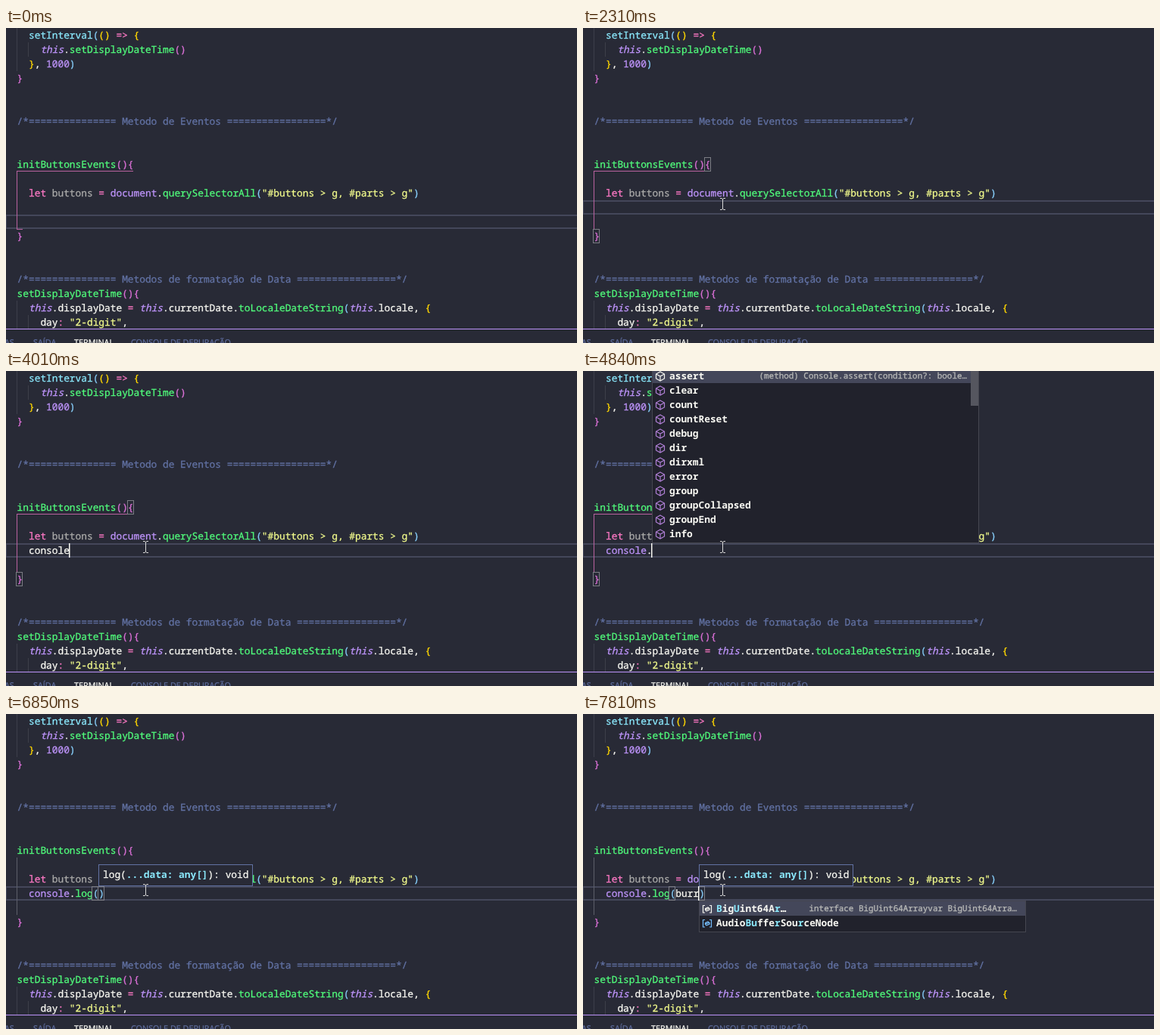
Recreate the animation shown at these times as an HTML page. Size 754 by 417 pixels, loop 8000 ms.

```html
<!DOCTYPE html>
<html lang="pt">
<head>
<meta charset="utf-8">
<title>Editor de código</title>
<style>
  html, body { margin: 0; width: 100%; height: 100%; overflow: hidden; background: #282a36; }
  svg { display: block; width: 754px; height: 417px; }
  text {
    font: 12.83px "Noto Sans Mono", "DejaVu Sans Mono", monospace;
    white-space: pre;
    text-rendering: geometricPrecision;
    fill: currentColor;
    stroke: currentColor;
    stroke-width: .3px;
  }
  .bold { font-weight: 600; stroke: none; }
  .italic { font-style: italic; }
  .detail { font-size: 10.9px; }
  .tab { font: 10.8px "Open Sans", "Noto Sans", sans-serif; }
</style>
</head>
<body>
<svg id="stage" viewBox="0 0 754 417"></svg>
<script>
const LOOP = 8000, BLINK = 490;
const LEFT = 13.9, CHAR = 7.697, ROW = 19;
const BEARING = .7; // text sits slightly right of its cell edge
const CLICK = 1340, CALL = 6360, HINT = 6480;

const color = {
  w: '#f8f8f2', c: '#8be9fd', g: '#50fa7b', p: '#ff79c6', v: '#bd93f9', i: '#bd93f9',
  y: '#f1fa8c', m: '#6272a4', u: '#a9a9a8', 1: '#ffd700', 2: '#da70d6', 3: '#87cefa'
};

// Each "~k" switches the colour key for the text after it.
const code = [
  [0, 2, '~csetInterval~3(~1() ~p=> ~1{'],
  [1, 4, '~ithis~w.~gsetDisplayDateTime~2()'],
  [2, 2, '~1}~w, ~v1000~3)'],
  [3, 0, '~2}'],
  [6, 0, '~m/*=============== Metodo de Eventos =================*/'],
  [9, 0, '~ginitButtonsEvents~2(){'],
  [11, 2, '~plet ~ubuttons ~p= ~vdocument~w.~gquerySelectorAll~3(~y"#buttons > g, #parts > g"~3)'],
  [14, 0, '~2}'],
  [17, 0, '~m/*=============== Metodos de formatação de Data =================*/'],
  [18, 0, '~gsetDisplayDateTime~2(){'],
  [19, 2, '~ithis~w.displayDate ~p= ~ithis~w.currentDate.~gtoLocaleDateString~3(~ithis~w.locale, ~1{'],
  [20, 4, '~wday~p: ~y"2-digit"~w,']
];

// Completion lists; the first letter of each entry is its icon kind.
const lists = {
  c: 'kcase kcatch kclass kconst kcontinue cCalcController mconfirm vconsole vcaches vcrypto mclearInterval mclearTimeout',
  con: 'mconfirm vconsole kconst kcontinue vConstantSourceNode vConvolverNode vCountQueuingStrategy vComment cCalcController vCompositionEvent vAbortController vAudioContext',
  conso: 'vconsole vConstantSourceNode vConvolverNode vCountQueuingStrategy vCompositionEvent',
  dot: 'massert mclear mcount mcountReset mdebug mdir mdirxml merror mgroup mgroupCollapsed mgroupEnd minfo',
  l: 'mlog mtimeLog mclear mtable mdirxml mprofile mprofileEnd mgroupCollapsed mtoLocaleString mvalueOf vlet vlocale',
  b: 'vbuttons kbreak vBlob mblur vbutton vBigInt vBoolean vBarProp vBaseAudioContext vBeforeUnloadEvent vBroadcastChannel vBigUint64Array',
  bu: 'vbuttons vButton vBigUint64Array mblur vAudioBuffer vSourceBuffer vArrayBuffer vSharedArrayBuffer vAudioBufferSourceNode vSourceBufferList vHTMLButtonElement vSubmitEvent',
  burr: 'vBigUint64Ar… vAudioBufferSourceNode'
};
const details = {
  c: '', con: 'function confirm(message?: string | undef…', conso: 'var console: Console',
  dot: '(method) Console.assert(condition?: boole…', l: '(method) Console.log(...data: any[]): void',
  b: 'let buttons: NodeListOf<Element>', bu: 'let buttons: NodeListOf<Element>',
  burr: 'interface BigUint64Arrayvar BigUint64Arra…'
};

// [time, typed text, open list, word being completed]
const typing = [
  [CLICK, ''],
  [2820, 'c'], [2890, 'c', 'c', 'c'], [2970, 'co', 'con', 'co'],
  [3080, 'con', 'con', 'con'], [3240, 'cons', 'conso', 'cons'], [3340, 'conso', 'conso', 'conso'],
  [4010, 'console'],
  [4760, 'console.'], [4830, 'console.', 'dot', ''], [5000, 'console.l', 'l', 'l'],
  [5300, 'console.log'],
  [CALL, 'console.log()'],
  [7140, 'console.log(b)'], [7200, 'console.log(b)', 'b', 'b'], [7290, 'console.log(bu)', 'bu', 'bu'],
  [7540, 'console.log(bur)', 'burr', 'bur'], [7680, 'console.log(burr)', 'burr', 'burr']
];

const stage = document.getElementById('stage');
const colX = n => LEFT + n * CHAR;
const esc = s => s.replace(/&/g, '&amp;').replace(/</g, '&lt;');
const rect = (x, y, w, h, fill) => `<rect x="${x}" y="${y}" width="${w}" height="${h}" fill="${fill}"/>`;
const frame = (x, y, w, h, fill, stroke) =>
  `<rect x="${x + .5}" y="${y + .5}" width="${w - 1}" height="${h - 1}" fill="${fill}" stroke="${stroke}"/>`;
const text = (x, y, s, ink, extra = '') => `<text x="${x}" y="${y}" color="${ink}" ${extra}>${esc(s)}</text>`;

function tokens(x, y, src, extra = '') {
  let out = '';
  for (const part of src.split('~').slice(1)) {
    const s = part.slice(1);
    const style = part[0] === 'i' ? 'class="italic"' : extra;
    out += text(x.toFixed(2), y, s, color[part[0]], style);
    x += s.length * CHAR;
  }
  return out;
}

const codeLine = ([row, col, src]) => tokens(colX(col) + BEARING, row * ROW + 14, src);
const bracketBox = (row, col) => frame(Math.floor(colX(col)), row * ROW, 9, ROW, 'none', '#7c7d84');

function currentLine(y) {
  const edge = '#44475a';
  return rect(0, y, 754, 2, edge) + rect(0, y + 17, 754, 2, edge) + rect(0, y, 1, ROW, edge);
}

function guides(active) {
  const dim = '#3d3f4a';
  let out = rect(14, 0, 1, 57, dim) + rect(29, 19, 1, 19, dim) +
    rect(14, 361, 1, 37, dim) + rect(29, 380, 1, 18, dim);
  if (!active) return out + rect(14, 190, 1, 76, '#5d5f69');
  const pink = '#b9629f';
  return out + rect(14, 189, 154, 1, pink) + rect(14, 189, 1, 78, pink) + rect(14, 266, 8, 1, pink);
}

function panel(hover) {
  const dim = '#5d6b9b', y = 420;
  const tab = (x, s, ink) => text(x, y, s, ink, 'class="tab"');
  return rect(0, 398, 754, 19, '#282a36') + rect(0, 398, 754, 1, '#bd93f9') +
    tab(-2, 'AS', dim) + tab(36, 'SAÍDA', dim) + tab(90, 'TERMINAL', color.w) +
    tab(165, 'CONSOLE DE DEPURAÇÃO', hover ? color.w : dim);
}

const iconPaths = {
  v: ['#75beff', 'M4 2.5H1.5V12H4M10 2.5H12.5V12H10M4.5 6.5L8 5L10 6.5V8L6 9.7L4.5 8.5ZM4.5 6.5L6 7.5L10 6'],
  k: ['#d4d4d4', 'M0 2.5H7M9 2.5H14M0 5.5H4M6 5.5H13M0 8.5H9M11 8.5H14M0 11.5H6M8 11.5H13'],
  m: ['#b180d7', 'M7 1L12.5 4V10L7 13L1.5 10V4ZM1.5 4L7 7L12.5 4M7 7V13'],
  c: ['#ee9d28', 'M1 5L4.5 1.5L7 4L3.5 7.5ZM5.5 6H9M7 6V11H9M9 6L11 4L13 6L11 8ZM9 11L11 9L13 11L11 13Z']
};
function icon(kind, x, y, selected) {
  const [stroke, d] = iconPaths[kind];
  return `<path transform="translate(${x} ${y})" d="${d}" fill="none" stroke="${selected ? '#f8f8f2' : stroke}" stroke-width="1.2"/>`;
}

// Marks matched letters: a contiguous hit first, then letters in order.
function label(name, word) {
  const low = name.toLowerCase(), hits = new Set();
  let at = Math.max(low.indexOf(word), low.indexOf(word[0]));
  for (const ch of word) {
    at = low.indexOf(ch, at);
    if (at < 0) break;
    hits.add(at++);
  }
  return [...name].reduce((out, ch, i) => {
    const key = hits.has(i) ? 'c' : 'w';
    const changed = !i || hits.has(i) !== hits.has(i - 1);
    return out + (changed ? '~' + key : '') + ch;
  }, '');
}

function popup(x, key, word) {
  const items = lists[key].split(' ');
  const h = items.length * ROW + 4;
  const tall = items.length > 8;
  const y = tall ? 228 - h : 247;
  let out = frame(x, y, 432, h, '#21222c', '#454650') + rect(x + 1, y + 1, 430, ROW, '#44475a');
  items.forEach((item, i) => {
    const top = y + 1 + i * ROW;
    out += icon(item[0], x + 4, top + 3, i === 0) +
      tokens(x + 23, top + 14, label(item.slice(1), word), 'class="bold"');
  });
  out += text(x + (tall ? 416 : 420), y + 14, details[key], '#b9bab8', 'class="detail" text-anchor="end"');
  if (tall) out += rect(x + 421, 0, 10, 46, '#55565f');
  return out;
}

const hint = x => frame(x, 199, 204, 29, '#282a36', '#6272a4') +
  tokens(x + 6, 217, '~wlog(') +
  tokens(x + 6 + 4 * CHAR, 217, '~c...data: any[]', 'class="bold"') +
  tokens(x + 6 + 18 * CHAR, 217, '~w): void');

function typedLine(s, t) {
  const name = s.slice(0, 7), rest = s.slice(7);
  let src = (t >= 4140 ? '~v' : '~w') + name;
  if (rest) {
    const [, member, args] = rest.match(/^\.(\w*)(.*)$/);
    src += '~w.' + (t >= 5430 ? '~g' : '~w') + member;
    if (args) src += '~3(~w' + args.slice(1, -1) + '~3)';
  }
  return codeLine([12, 2, src]);
}

function mousePos(t) {
  const k = Math.min(1, (t - 260) / 800);
  const e = 1 - (1 - k) ** 2, r = 1 - e;
  const mix = (a, b, c, d) => r * r * r * a + 3 * r * r * e * b + 3 * r * e * e * c + e * e * e * d;
  return [Math.round(mix(225, 95, 62, 184)), Math.round(mix(422, 380, 240, 233))];
}

function mouse(x, y) {
  const arrow = y > 398;
  const d = arrow ? 'M0 0V15L4 11L7 17L9 16L6 10H11Z'
    : 'M-3 -7.5H-1L.5 -6.5L2 -7.5H4M.5 -6.5V6.5M-3 7.5H-1L.5 6.5L2 7.5H4';
  return `<path transform="translate(${x} ${y})" d="${d}" fill="${arrow ? '#fff' : 'none'}" stroke="${arrow ? '#222' : '#d8d8d8'}"/>`;
}

const staticCode = code.map(codeLine).join('');

function draw(t) {
  const step = typing.filter(s => s[0] <= t).pop();
  const clicked = !!step, called = t >= CALL;
  const pos = t >= 260 ? mousePos(t) : null;

  let out = rect(0, 0, 754, 417, '#282a36') +
    currentLine(clicked ? 228 : 247) + guides(!called) + staticCode;

  if (clicked) {
    const [since, typed, key, word] = step;
    const col = 2 + typed.length - (typed.endsWith(')') ? 1 : 0);
    const x = Math.floor(colX(col));
    out += typedLine(typed, t);
    out += called ? bracketBox(12, 13) + bracketBox(12, col) : bracketBox(9, 19) + bracketBox(14, 0);
    if (Math.floor((t - since) / BLINK) % 2 === 0) out += rect(x, 228, 1.5, ROW, color.w);
    out += panel(false);
    if (t >= HINT) out += hint(x + 1);
    if (key) out += popup(x + 1, key, word);
  } else {
    out += panel(pos && pos[1] > 400 && pos[0] > 165);
  }

  if (t >= 1180 && t < 1420) out += '<circle cx="182" cy="232" r="12" fill="#ff0" fill-opacity=".5"/>';
  if (pos) out += mouse(...pos);
  return out;
}

let shown = '';
const begin = performance.now();
function tick() {
  const next = draw((performance.now() - begin) % LOOP);
  if (next !== shown) stage.innerHTML = shown = next;
  requestAnimationFrame(tick);
}
tick();
</script>
</body>
</html>
```
